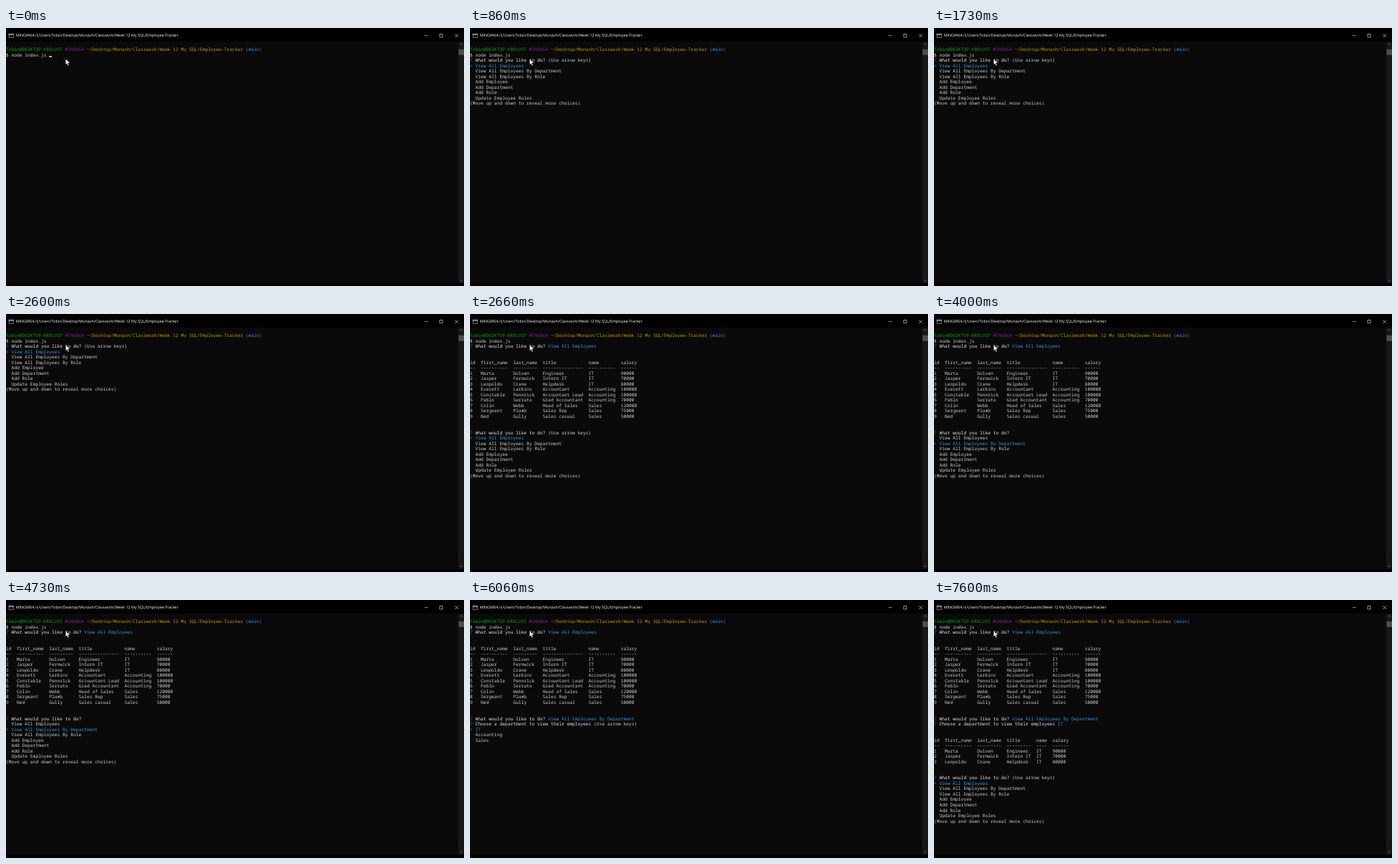
Recreate the animation shown at these times as an HTML page. Size 640x360 px, loop 8000 ms.

```html
<!DOCTYPE html>
<html lang="en">
<head>
<meta charset="utf-8">
<title>Employee tracker terminal</title>
<style>
  html, body { margin: 0; width: 100%; height: 100%; overflow: hidden; background: #000; }
  /* Laid out on an 8 x 16 character grid, then scaled to the stage.
     The tiny turn keeps text rows from snapping to whole pixels. */
  #desk {
    position: absolute; left: 0; top: 0; width: 1360px; height: 765px;
    transform: scale(.4705882) rotate(.004deg); transform-origin: 0 0;
    overflow: hidden; background: #000; text-rendering: geometricPrecision;
  }
  #title {
    position: absolute; left: 29px; top: 15px; white-space: pre;
    font: 11.5px/16px "Open Sans", sans-serif; color: #fff;
  }
  #client { position: absolute; left: 0; top: 40px; width: 1343px; height: 716px; background: #0a0a0a; }
  pre {
    position: absolute; left: 0; top: 15px; margin: 0; width: 100%;
    font: 13.3333px/16px "Noto Sans Mono", monospace; color: #ccc;
  }
  .screen { top: 31px; height: 685px; background: #0a0a0a; animation: 8s step-end infinite; }
  .g { color: #13a10e; }
  .m { color: #881798; }
  .y { color: #c19c00; }
  .b { color: #3a96dd; }
  .w { color: #e6e6e6; }
  .caret { display: inline-block; width: 8px; height: 3px; background: #f2f2f2; vertical-align: -2px; }
  svg { position: absolute; left: 0; top: 0; }

  @keyframes run    { 0% { visibility: hidden } 5%     { visibility: visible } }
  @keyframes menu   { 0% { visibility: hidden } 8.25%  { visibility: visible } }
  @keyframes all    { 0% { visibility: hidden } 33.25% { visibility: visible } }
  @keyframes down   { 0% { visibility: hidden } 48.25% { visibility: visible } }
  @keyframes choose { 0% { visibility: hidden } 75.75% { visibility: visible } }
  @keyframes result { 0% { visibility: hidden } 95%    { visibility: visible } }
</style>
</head>
<body>
<div id="desk">
  <div id="title">MINGW64:/c/Users/Tobin/Desktop/Monash/Classwork/Week 12 My SQL/Employee-Tracker</div>
  <div id="client">
    <pre><span class="g">Tobin@DESKTOP-KRELVO7</span> <span class="m">MINGW64</span> <span class="y">~/Desktop/Monash/Classwork/Week 12 My SQL/Employee-Tracker</span> <span class="b">(main)</span></pre>
  </div>
  <svg width="1360" height="765" fill="none">
    <!-- window icon and buttons -->
    <rect x="8.5" y="17.5" width="14" height="11" fill="#111" stroke="#ccc"/>
    <path d="M8 19h15" stroke="#ddd" stroke-width="2"/>
    <path d="M1243 22.5h10M1287.500 18h9v9h-9zM1333 17.500l10 10m0-10l-10 10" stroke="#fff" stroke-width="1.2"/>
    <!-- scrollbar -->
    <rect x="1343" y="40" width="17" height="716" fill="#171717"/>
    <rect x="1344" y="63" width="16" height="17" fill="#4d4d4d"/>
    <path d="M1348 50l4-4 4 4M1348 746l4 4 4-4" stroke="#777" stroke-width="1.6"/>
    <!-- mouse pointer -->
    <path d="M177 92v17l4-4 3 7 3-1.3-3-6.700h6z" fill="#fff" stroke="#000" stroke-width=".8"/>
  </svg>
</div>
<script>
  const ink = (cls, text) => `<span class="${cls}">${text}</span>`;
  const ask = (text, rest = '') => `${ink('g', '?')} ${ink('w', text)} ${rest}`;
  const pick = (items, at) =>
    items.map((item, i) => i === at ? ink('b', '&gt; ' + item) : '  ' + item);

  const hint = '(Use arrow keys)';
  const todo = 'What would you like to do?';
  const dept = 'Choose a department to view their employees';
  const views = ['View All Employees', 'View All Employees By Department', 'View All Employees By Role'];
  const options = [...views, 'Add Employee', 'Add Department', 'Add Role', 'Update Employee Roles'];
  const menu = (at, note) =>
    [ask(todo, note), ...pick(options, at), '(Move up and down to reveal more choices)'];

  const head = ['id', 'first_name', 'last_name', 'title', 'name', 'salary'];
  const staff = [
    'Marta,Dolven,Engineer,IT,90000',
    'Jasper,Fernwick,Intern IT,IT,70000',
    'Leopoldo,Crane,Helpdesk,IT,80000',
    'Everett,Larkins,Accountant,Accounting,100000',
    'Constable,Pennrick,Accountant Lead,Accounting,100000',
    'Pablo,Serrato,Grad Accountant,Accounting,70000',
    'Colin,Webb,Head of Sales,Sales,120000',
    'Sergeant,Plumb,Sales Rep,Sales,75000',
    'Ned,Gully,Sales casual,Sales,50000'
  ].map((line, i) => [String(i + 1), ...line.split(',')]);

  // Column widths follow the longest cell, with two spaces between columns
  function table(rows) {
    const wide = head.map((name, c) => Math.max(name.length, ...rows.map(r => r[c].length)));
    const rule = wide.map(n => '-'.repeat(n));
    const lines = [head, rule, ...rows].map(r => r.map((cell, c) => cell.padEnd(wide[c])).join('  '));
    return ['', '', ...lines, '', ''];
  }

  const command = '$ node index.js';
  const caret = '<span class="caret"></span>';
  const listed = [command, ask(todo, ink('b', views[0])), ...table(staff)];
  const byDept = [...listed, ask(todo, ink('b', views[1]))];

  const screens = {
    none: [command + ' ' + caret],
    run: [command, caret],
    menu: [command, ...menu(0, hint)],
    all: [...listed, ...menu(0, hint)],
    down: [...listed, ...menu(1)],
    choose: [...byDept, ask(dept, hint), ...pick(['IT', 'Accounting', 'Sales'], 0)],
    result: [...byDept, ask(dept, ink('b', 'IT')), ...table(staff.slice(0, 3)), ...menu(0, hint)]
  };

  const client = document.getElementById('client');
  for (const [name, lines] of Object.entries(screens)) {
    const pre = document.createElement('pre');
    pre.className = 'screen';
    pre.style.animationName = name;
    pre.innerHTML = lines.join('\n');
    client.append(pre);
  }
</script>
</body>
</html>
```
